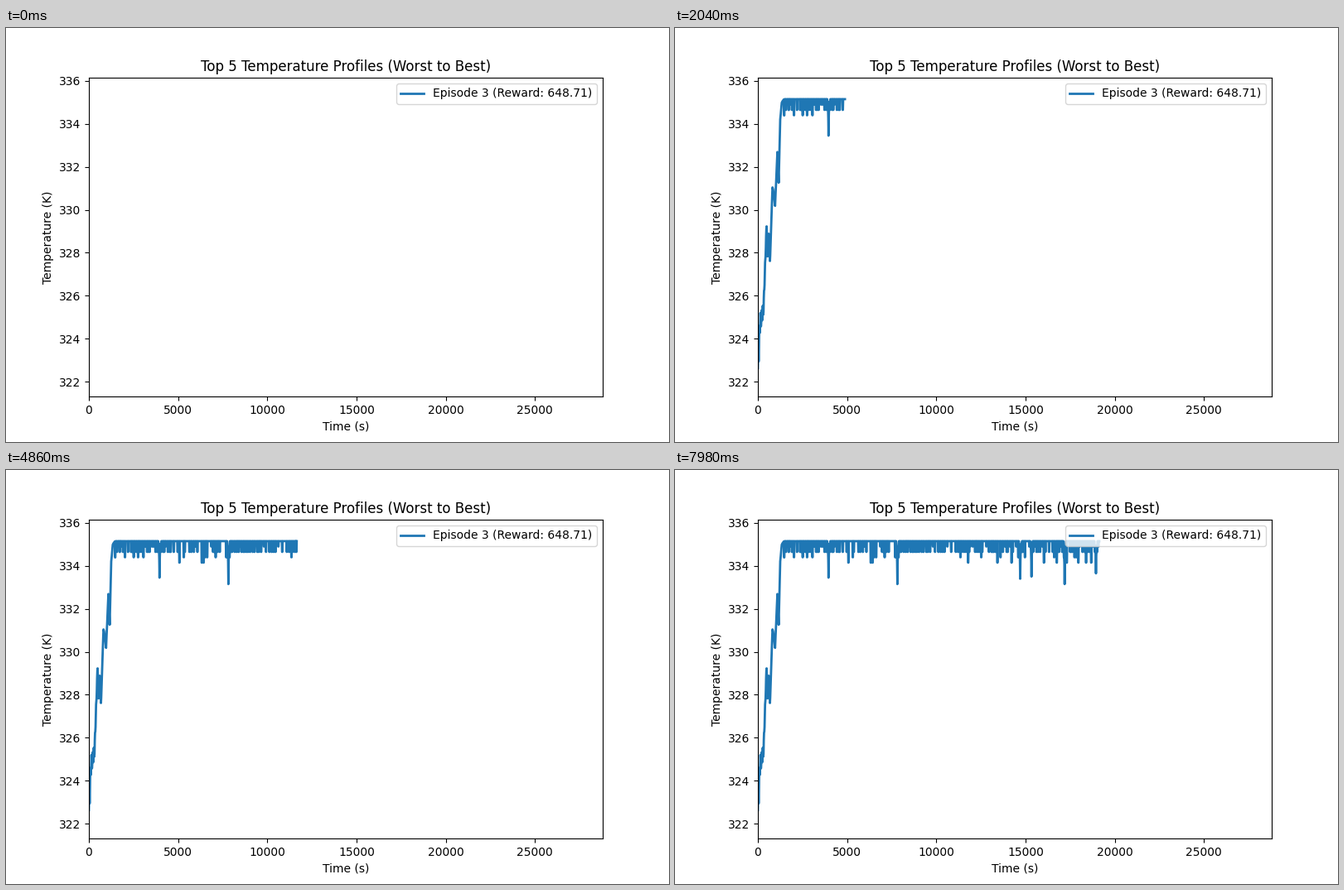
A matplotlib script that plays this animation: 800x500 px, repeating every 8000 ms.

```python
import numpy as np
import matplotlib.pyplot as plt
from matplotlib.animation import FuncAnimation

DURATION = 28800      # simulated seconds
SAMPLES = 2000
PER_STEP = 10         # samples added at each step
T_MAX = 335.15        # upper temperature limit

# Turning points of the heating phase: (sample index, temperature)
RISE = [(0, 322.63), (8, 324.7), (22, 325.4), (34, 329.3), (38, 327.8),
        (42, 328.8), (47, 327.6), (57, 331.1), (67, 330.2), (76, 332.7),
        (81, 331.25), (87, 334.2), (93, 335.0), (102, T_MAX)]

# Deepest drops below the limit: (sample index, depth)
DROPS = [(275, 1.7), (543, 2.0), (1021, 1.75), (1065, 1.65),
         (1194, 2.0), (1316, 1.5)]


def profile():
    rng = np.random.default_rng(5)
    k = np.arange(SAMPLES)
    temp = np.interp(k, *zip(*RISE))
    temp += 0.6 * np.exp(-k / 25) * np.sin(1.4 * k)

    # short random dips, spaced by random pauses at the limit
    i = RISE[-1][0]
    while i < SAMPLES:
        temp[i:i + 2] -= rng.choice([0.25, 0.5, 0.75, 1.0],
                                    p=[0.2, 0.6, 0.1, 0.1])
        i += 4 + int(rng.exponential(4))

    for i, depth in DROPS:
        near = slice(i - 4, i + 5)
        spike = depth * np.exp(-np.abs(k[near] - i) / 1.5)
        temp[near] = np.minimum(temp[near], T_MAX - spike)
    return np.minimum(temp, T_MAX)


time = np.arange(SAMPLES) * DURATION / SAMPLES
temp = profile()

fig, ax = plt.subplots(figsize=(8, 5), dpi=100)
line, = ax.plot([], [], lw=2, label="Episode 3 (Reward: 648.71)")
ax.set_xlim(0, DURATION)
ax.set_ylim(321.31, T_MAX + 1)
ax.set_title("Top 5 Temperature Profiles (Worst to Best)")
ax.set_xlabel("Time (s)")
ax.set_ylabel("Temperature (K)")
ax.legend(loc="upper right")


def update(tick):
    # a new step every 60 ms, with ticks of 20 ms
    n = tick // 3 * PER_STEP
    line.set_data(time[:n], temp[:n])
    return line,


anim = FuncAnimation(fig, update, frames=400, interval=20, repeat=True,
                     repeat_delay=0)
plt.show()
```
